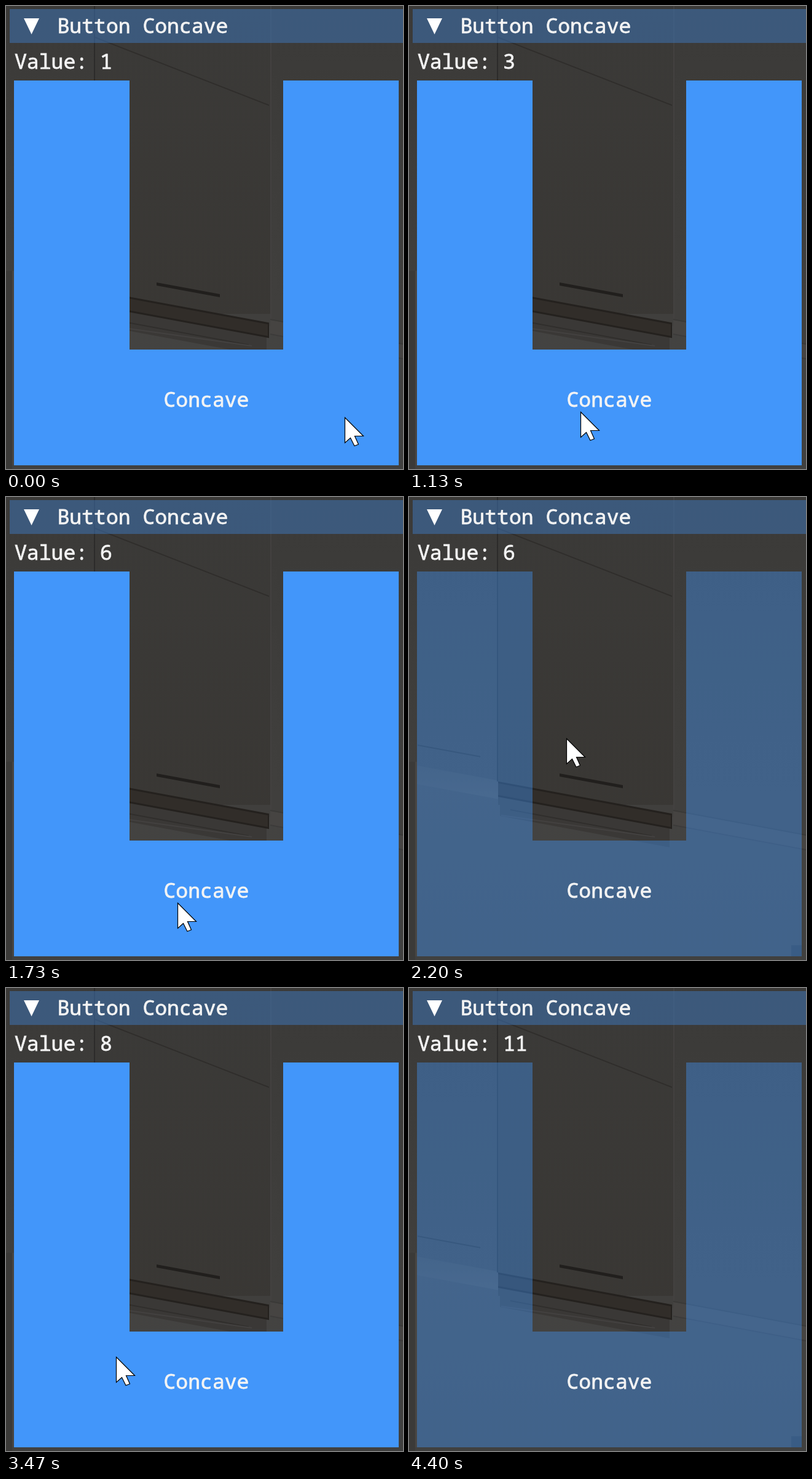
An HTML page with a canvas that plays this animation: 646 px wide and 752 px high, repeating every 5.34 s.

```html
<!DOCTYPE html>
<html lang="en">
<head>
<meta charset="utf-8">
<title>Button Concave</title>
<style>
html, body { margin: 0; width: 100%; height: 100%; overflow: hidden; background: #3a3937; }
canvas { display: block; }
</style>
</head>
<body>
<canvas id="stage" width="646" height="752"></canvas>
<script>
const ctx = document.getElementById('stage').getContext('2d');
const LOOP = 5340, TICK = 1000 / 15;

// Two bursts of evenly spaced clicks, in ticks
const BURSTS = [12.05, 46.95], CLICKS = 5, PERIOD = 3.1, HOLD = 1.1;

// Pointer moves: start tick, end tick, x, y, optional curve control point
const HOME = [551, 668];
const MOVES = [
  [0, 9, 265, 640, 330, 230],
  [10, 12, 279, 659],
  [28, 33, 256, 392],
  [35, 37, 264, 399],
  [42, 46, 179, 599],
  [62, 66, 188, 765]
];

function path(points) {
  ctx.beginPath();
  points.forEach(([x, y]) => ctx.lineTo(x, y));
}
function poly(color, ...points) {
  path(points);
  ctx.fillStyle = color;
  ctx.fill();
}
function rect(color, x, y, w, h) {
  ctx.fillStyle = color;
  ctx.fillRect(x, y, w, h);
}
// Band of height h whose top edge starts at (x, y) and recedes to the right
function strip(color, x, y, w, h, slope = 0.185) {
  const end = y + w * slope;
  poly(color, [x, y], [x + w, end], [x + w, end + h], [x, y + h]);
}
function fade(y0, y1, from, to) {
  const g = ctx.createLinearGradient(0, y0, 0, y1);
  g.addColorStop(0, from);
  g.addColorStop(1, to);
  return g;
}
function text(str, x, y) {
  ctx.font = '500 33.1px "Noto Sans Mono", "DejaVu Sans Mono", monospace';
  ctx.fillStyle = ctx.strokeStyle = '#f4f4f4';
  ctx.lineWidth = 0.8;
  ctx.fillText(str, x, y);
  ctx.strokeText(str, x, y);
}

// Dim kitchen behind the window
function kitchen() {
  rect(fade(0, 480, '#3b3a38', '#403f3d'), 0, 0, 646, 752);
  strip(fade(430, 752, '#454442', '#40403f'), 0, 440, 646, 320);
  rect(fade(0, 520, '#3b3a38', '#393734'), 145, 0, 285, 500);
  strip(fade(430, 490, '#44423f', '#4d4b49'), 12, 436, 133, 30);
  strip('#464442', 430, 510, 216, 24);
  strip('#3a3937', 430, 508, 216, 2);
  strip('#3c3b3a', 430, 532, 216, 2);
  rect('#2c2b2a', 143, 0, 2, 462);
  rect('#434140', 430, 0, 2, 508);
  strip('#2f2d2b', 145, 50, 283, 2, 0.39);
  strip('#302e2c', 14, 402, 102, 2);
  strip('#211f1d', 245, 449, 103, 5);
  // Extractor hood
  strip('#3a3836', 148, 484, 276, 34);
  strip('#302e2c', 165, 507, 230, 2);
  strip('#434140', 150, 516, 250, 2, 0.14);
  strip('#24211e', 145, 462, 283, 25);
  strip('#312d29', 145, 465, 281, 19);
  // Window margin
  rect('#3b3a38', 0, 430, 10, 322);
  rect('#484542', 10, 430, 3, 316);
}

function button(color) {
  poly(color, [13, 121], [201, 121], [201, 558], [451, 558],
    [451, 121], [639, 121], [639, 746], [13, 746]);
}

function pointerAt(tick) {
  let [x, y] = HOME;
  for (const [t0, t1, x1, y1, cx = (x + x1) / 2, cy = (y + y1) / 2] of MOVES) {
    if (tick <= t0) break;
    const u = Math.min(1, (tick - t0) / (t1 - t0));
    const e = u * u * (3 - 2 * u);
    const bend = (a, c, b) => (1 - e) ** 2 * a + 2 * e * (1 - e) * c + e * e * b;
    [x, y] = [bend(x, cx, x1), bend(y, cy, y1)];
  }
  return [Math.round(x), Math.round(y)];
}

function presses(tick) {
  return BURSTS.reduce((sum, begin) => {
    const count = Math.floor((tick - begin) / PERIOD) + 1;
    return sum + Math.max(0, Math.min(CLICKS, count));
  }, 0);
}

function inButton(x, y) {
  const inHole = x > 201 && x < 451 && y < 558;
  return x >= 13 && x < 639 && y >= 121 && y < 746 && !inHole;
}

function pointer(x, y) {
  const shape = [[0, 0], [0, 41], [9, 33], [15.5, 46], [22, 43.5], [16, 30], [30, 30]]
    .map(([dx, dy]) => [x + dx + .5, y + dy + .5]);
  poly('#fff', ...shape);
  ctx.closePath();
  ctx.strokeStyle = '#000';
  ctx.lineWidth = 1.2;
  ctx.stroke();
}

function draw(time) {
  const tick = Math.floor((time % LOOP + 4) / TICK);
  const [x, y] = pointerAt(tick);
  const hovered = inButton(x, y);
  const released = presses(tick - HOLD);
  const pressed = presses(tick) > released;

  kitchen();
  rect('rgba(62, 120, 190, .5)', 6, 5, 640, 55);
  poly('#fff', [29, 20], [54, 20], [41.5, 46]);
  text('Button Concave', 83.5, 43.5);
  text('Value: ' + (1 + released), 14, 101.5);
  button(pressed ? '#0f87fa' : hovered ? '#4296fa' : 'rgba(66, 150, 250, .4)');
  if (!hovered) rect('rgba(45, 80, 125, .4)', 622, 728, 17, 18);
  text('Concave', 256.5, 651);
  pointer(x, y);
}

let begin;
function frame(now) {
  begin ??= now;
  draw(now - begin);
  requestAnimationFrame(frame);
}
requestAnimationFrame(frame);
</script>
</body>
</html>
```
